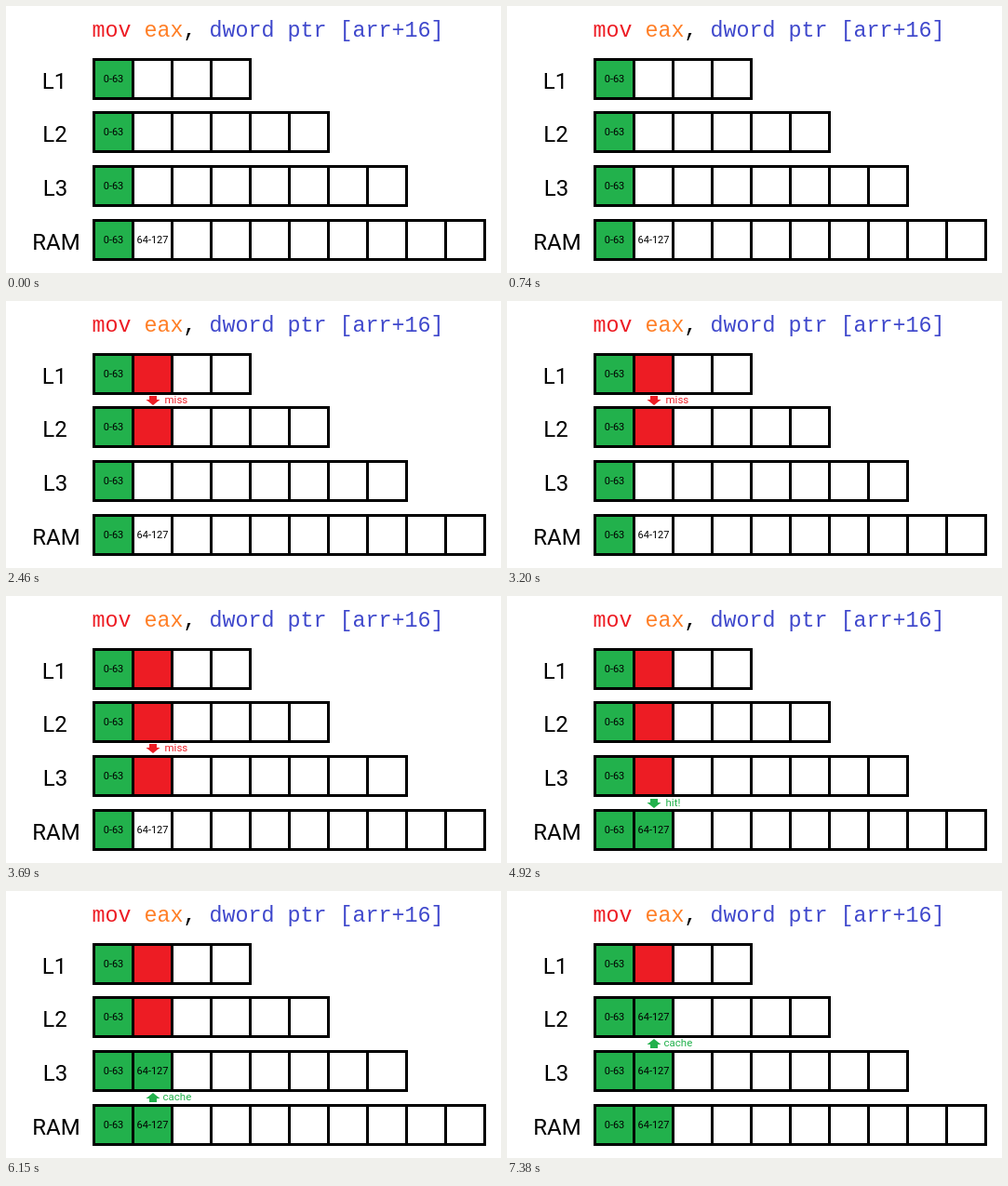
These frames come from a looping animation (532x287 px, 8000 ms). An HTML page:

```html
<!DOCTYPE html>
<html lang="en">
<head>
<meta charset="utf-8">
<title>Cache lookup</title>
<style>
  @property --step { syntax: "<integer>"; inherits: true; initial-value: 0; }
  @keyframes steps {
    0% { --step: 0; }
    15.375% { --step: 1; }
    30.75% { --step: 2; }
    46.125% { --step: 3; }
    61.5% { --step: 4; }
    76.875% { --step: 5; }
    92.25%, 100% { --step: 6; }
  }
  html, body { margin: 0; width: 100%; height: 100%; overflow: hidden; background: #fff; }
  svg { display: block; width: 532px; height: 287px; animation: steps 8s step-end infinite; }
  .timed {
    opacity: calc(clamp(0, var(--step) - var(--from) + 1, 1) * clamp(0, var(--to) - var(--step), 1));
  }
  text { font-family: Roboto, sans-serif; }
  .code { font: 23.33px "Liberation Mono", "Courier New", monospace; white-space: pre; }
  .level { font-size: 24px; text-anchor: middle; }
  .range { font-size: 11px; text-anchor: middle; }
  .note { font-size: 11.5px; }
  .grid { fill: none; stroke: #000; stroke-width: 3; }
  .red { fill: #ed1c24; }
  .green { fill: #22b14c; }
  .orange { fill: #ff7f27; }
  .blue { fill: #3f48cc; }
</style>
</head>
<body>
<svg id="stage" viewBox="0 0 532 287" xmlns="http://www.w3.org/2000/svg">
  <text class="code" x="92.5" y="33"><tspan class="red">mov</tspan> <tspan class="orange">eax</tspan>, <tspan class="blue">dword ptr [arr+16]</tspan></text>
</svg>
<script>
const stage = document.getElementById("stage");
const LEFT = 94.5, CELL = 42, END = 7;

function add(tag, attrs, text, parent = stage) {
  const el = document.createElementNS(stage.namespaceURI, tag);
  for (const key in attrs) el.setAttribute(key, attrs[key]);
  if (text) el.textContent = text;
  return parent.appendChild(el);
}

const timed = (from, to = END) =>
  add("g", { class: "timed", style: `--from:${from};--to:${to}` });

function fillCell(col, y, color, parent) {
  add("rect", { x: LEFT + col * CELL, y, width: CELL, height: CELL, class: color }, "", parent);
}

function label(col, y, text, parent) {
  add("text", { x: LEFT + (col + 0.5) * CELL, y: y + 24.5, class: "range" }, text, parent);
}

// miss / hit: the step at which the second cell turns red / green
const rows = [
  { name: "L1", x: 52, y: 57.5, cells: 4, miss: 1 },
  { name: "L2", x: 52.5, y: 114.5, cells: 6, miss: 2, hit: 6 },
  { name: "L3", x: 53, y: 172.5, cells: 8, miss: 3, hit: 5 },
  { name: "RAM", x: 54, y: 230.5, cells: 10, hit: 4 }
];

for (const { name, x, y, cells, miss, hit } of rows) {
  add("text", { x, y: y + 31.5, class: "level" }, name);
  fillCell(0, y, "green");
  label(0, y, "0-63");
  if (miss) fillCell(1, y, "red", timed(miss, hit));
  if (hit) {
    const group = timed(hit);
    fillCell(1, y, "green", group);
    label(1, y, "64-127", miss ? group : stage);
  }
  let d = `M${LEFT} ${y}h${cells * CELL}v${CELL}h${-cells * CELL}z`;
  for (let i = 1; i < cells; i++) d += `M${LEFT + i * CELL} ${y}v${CELL}`;
  add("path", { d, class: "grid" });
}

function note(step, text, color, x, y, textX, up) {
  const group = timed(step, step + 1);
  const d = up
    ? `M${x} ${y}l7.5 6h-3.5v4h-8v-4h-3.5z`
    : `M${x} ${y + 10}l7.5 -6h-3.5v-4h-8v4h-3.5z`;
  add("path", { d, class: color }, "", group);
  add("text", { x: textX, y: y + 8, class: "note " + color }, text, group);
}

note(1, "miss", "red", 157, 43, 169.5);
note(2, "miss", "red", 158, 102, 170.5);
note(3, "miss", "red", 158, 159, 170.5);
note(4, "hit!", "green", 158, 218, 170.5);
note(5, "cache", "green", 158, 217, 168.5, true);
note(6, "cache", "green", 158, 159, 168.5, true);
</script>
</body>
</html>
```
